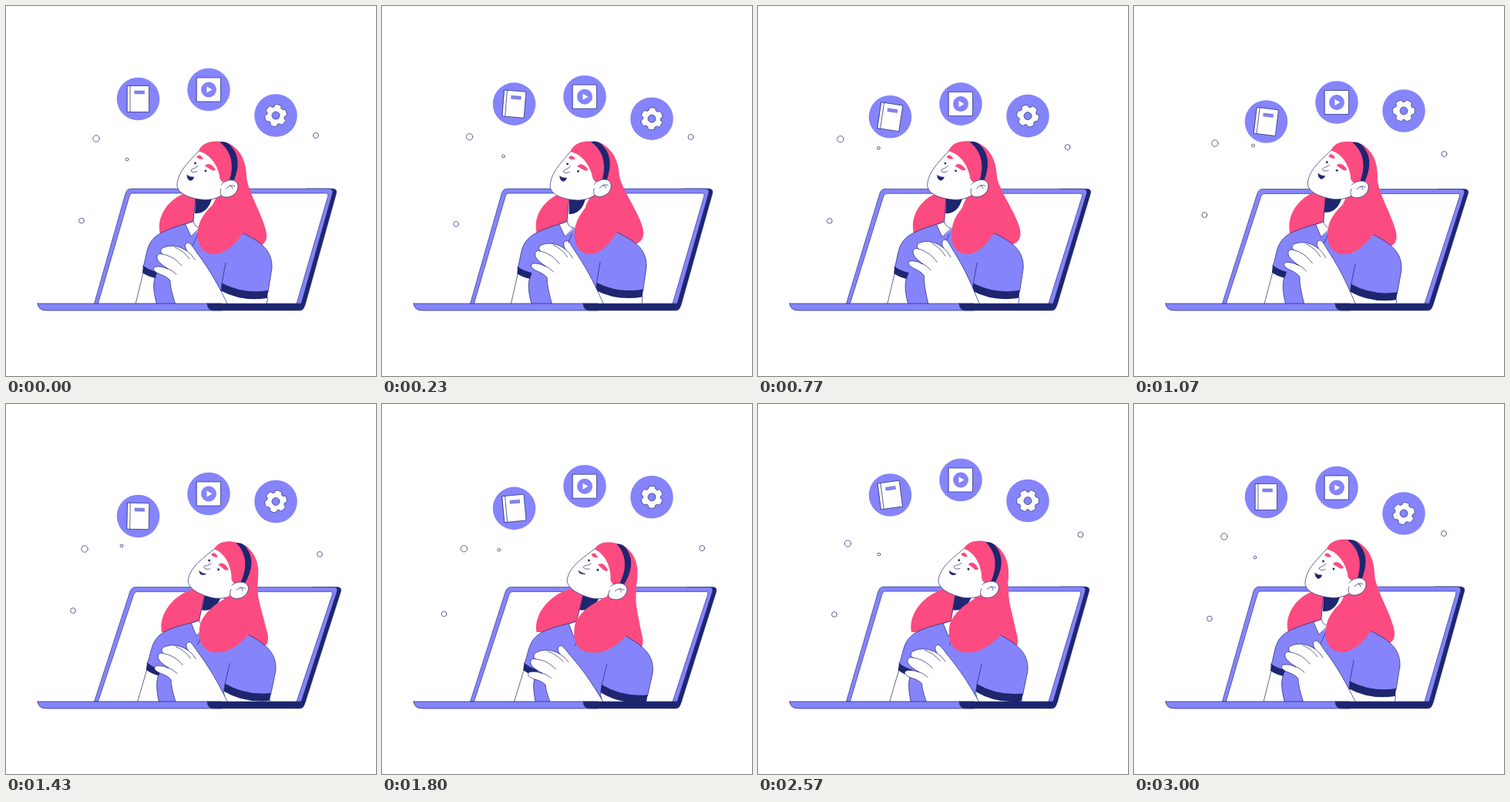
An HTML page with a canvas for the animation above (3.03 s loop, 480x480 px).

```html
<!DOCTYPE html>
<html>
<head>
<meta charset="utf-8">
<style>
html, body { margin: 0; width: 100%; height: 100%; overflow: hidden; background: #fff }
canvas { display: block; width: 480px; height: 480px }
</style>
</head>
<body>
<canvas id="stage"></canvas>
<script>
const PURPLE = '#8584fb', NAVY = '#1e2670', PINK = '#fc4b80', WHITE = '#fff';
const LOOP = 3030, CYCLE = 3000;
const TIMES = [0, 470, 1070, 1430, 2170, 2570];
const canvas = document.getElementById('stage');
const ratio = window.devicePixelRatio || 1;
canvas.width = canvas.height = 480 * ratio;
const ctx = canvas.getContext('2d');
let now = 0;

// Smooth periodic curve through the given values
function track(values, times = TIMES) {
  const n = values.length;
  const time = i => times[(i + n) % n] + Math.floor(i / n) * CYCLE;
  const value = i => values[(i + n) % n];
  let i = n - 1;
  while (time(i) > now) i--;
  const span = time(i + 1) - time(i), u = (now - time(i)) / span;
  const slope = k => (value(k + 1) - value(k - 1)) / (time(k + 1) - time(k - 1)) * span;
  const a = value(i), b = value(i + 1), m = slope(i), k = slope(i + 1);
  return a + m * u + (3 * (b - a) - 2 * m - k) * u * u + (2 * (a - b) + m + k) * u ** 3;
}

function turn(angle, px, py, dx = 0, dy = 0) {
  const c = Math.cos(angle), s = Math.sin(angle);
  return (x, y) => [
    px + dx + (x - px) * c - (y - py) * s,
    py + dy + (x - px) * s + (y - py) * c
  ];
}

const ramp = (v, from, to) => {
  const u = Math.min(1, Math.max(0, (v - from) / (to - from)));
  return u * u * (3 - 2 * u);
};

// Mix of two maps, weighted by place
function mix(f, g, weight) {
  return (x, y) => {
    const w = weight(x, y), a = f(x, y), b = g(x, y);
    return [a[0] + (b[0] - a[0]) * w, a[1] + (b[1] - a[1]) * w];
  };
}

const still = (x, y) => [x, y];

function shape(d, fill, line, map = still) {
  const path = new Path2D(d.replace(/(-?[\d.]+) (-?[\d.]+)/g,
    (_, x, y) => map(+x, +y).map(v => v.toFixed(2)).join(' ')));
  if (fill) { ctx.fillStyle = fill; ctx.fill(path); }
  if (line) { ctx.strokeStyle = NAVY; ctx.lineWidth = line; ctx.stroke(path); }
}

function disc(x, y, r, fill, line, ry = r) {
  ctx.beginPath();
  ctx.ellipse(x, y, r, ry, 0, 0, 7);
  if (fill) { ctx.fillStyle = fill; ctx.fill(); }
  if (line) { ctx.strokeStyle = NAVY; ctx.lineWidth = line; ctx.stroke(); }
}

function box(x, y, w, h, fill, line) {
  shape(`M${x} ${y}L${x + w} ${y}L${x + w} ${y + h}L${x} ${y + h}Z`, fill, line);
}

function badge(x, y, angle, draw) {
  ctx.save();
  ctx.translate(x, y);
  disc(0, 0, 27.8, PURPLE);
  ctx.rotate(angle);
  draw();
  ctx.restore();
}

function book() {
  box(-14, -17, 28, 34, WHITE, .7);
  shape('M-10.5 -17L-10.5 17', null, .7);
  box(-4.5, -10.5, 12.5, 4, PURPLE, .3);
}

function video() {
  box(-15.5, -15.5, 31, 31, WHITE, .7);
  disc(0, 0, 10, PURPLE);
  shape('M-2.5 -4L4.5 0L-2.5 4Z', WHITE);
}

function gear() {
  let d = '';
  for (let i = 0; i < 6; i++) {
    const p = (r, a) => {
      const t = (i * 60 + a) * Math.PI / 180;
      return `${(r * Math.cos(t)).toFixed(2)} ${(r * Math.sin(t)).toFixed(2)}`;
    };
    d += `${i ? 'L' : 'M'}${p(11.8, -22)}L${p(14.4, -16)}Q${p(15, 0)} ${p(14.4, 16)}L${p(11.8, 22)}Q${p(11, 30)} ${p(11.8, 38)}`;
  }
  shape(d + 'Z', WHITE, .6);
  disc(0, 0, 5, PURPLE, .6);
}

function screen() {
  const lean = track([0, 1, 5, 6, 4, 1]);
  const map = (x, y) => {
    const rise = (386 - y) / 149;
    return [x + lean * rise, y + lean * .1 * rise];
  };
  shape('M340 386L390 237L423 237Q430 237 428.500 243L388 388L340 388Z', NAVY, .6, map);
  shape('M114.500 386L155 243Q157 237 162 237L419 237Q425 237.500 423.500 243L383 386Z', PURPLE, .6, map);
  shape('M119.500 386L160 247Q161 243 164 243L415 243Q418.500 243 417.500 247L377 386Z', WHITE, .6, map);
}

function base() {
  shape('M41 386L280 386L280 395L52 395Q42 395 41 386Z', PURPLE, .7);
  shape('M261 386L388 386Q387 395 381 395L270 395Q261 395 261 386Z', NAVY, .5);
}

function face(head) {
  shape('M251 187C241 199 223 213 222 232C222 246 246 251 259 251.500C270 251 278 248 284 242L290 215L272 183Z', WHITE, .7, head);
  shape('M249 207C247 211 239 211 240 214Q243 217 248 214.500', null, .7, head);
  shape('M247 196Q251 190 256 198Q251 200 247 196Z', PINK, 0, head);
  shape('M258 207.500Q264 201 272 212Q270 215 266 212.500Q262 210 258 207.500Z', PINK, 0, head);
  const lid = Math.min(1, Math.max(.3, Math.abs(now - 470) / 110));
  for (const [x, y] of [[245.5, 204], [259, 214]])
    disc(...head(x, y), 1.8 - .4 * lid, NAVY, 0, 1.4 * lid);
  const gape = track([1, .8, .9, .3, 0, .35]);
  shape(`M235 219.500Q239 ${222 + gape * .5} 244 222Q${243 - gape} ${222 + 4.5 * gape} 239 ${222.5 + 4 * gape}Q235 ${222 + 3 * gape} 235 219.500Z`,
    NAVY, .6, head);
}

function person() {
  const head = turn(track([0, -3, 3, 8, 11, 7]) * Math.PI / 180, 291, 237,
    track([0, -5, 3, 13, 17, 11]), track([0, -1, 1, 5, 7, 4]));
  const body = turn(track([0, -.024, .018, .045, .062, .045]), 265, 450,
    0, track([0, 0, 1, 2.5, 4.5, 3]));
  const hand = turn(track([0, .08, .065, .005, -.13, -.05]), 285, 386,
    track([0, 0, 0, 1, 1, 1]), track([0, 0, 0, 2, 3, 3]));
  const sway = track([0, 2, 2.5, 2, -1, -1]), drop = track([0, -5, 1, 6, 12, 9]);
  const tips = (x, y) => [x + sway, y + drop * Math.max(0, (x - 270) / 68)];
  const falling = (x, y) => ramp(y, 215, 290);
  const hair = mix(head, tips, falling);
  const lock = mix(head, mix(tips, body, x => ramp(x, 268, 308)), falling);
  const neck = mix(head, body, (x, y) => ramp(y, 252, 284));

  ctx.save();
  ctx.beginPath();
  ctx.rect(0, 0, 480, 386);
  ctx.clip();

  // Hair behind the shoulders
  shape('M234 242C211 250 194 273 200 296L246 296L256 246Z', PINK, 0, hair);
  shape('M285 177C303 183 312 200 312 222C314 240 330 266 336 287C341 303 337 310 324 313L300 320L255 290L270 245Z', PINK, 0, hair);

  // Shirt and arms
  shape('M178 338C184 322 180 304 204 293C216 287 230 284 243 279L300 291C325 303 346 313 345 340L340 371Q308 376 280 360L279 370L286 396L198 396C191 372 189 358 196 346Q186 343 178 338Z', PURPLE, .7, body);
  shape('M279 369L286 396L337 396L339.500 379Z', WHITE, 0, body);
  shape('M339.500 379L336 400', null, .7, body);
  shape('M178 337Q186 343 196 345L193.500 353Q184 351 177 346Z', NAVY, 0, body);
  shape('M178 346L165.500 397', null, .7, body);
  shape('M280 359.500Q308 374 340 369L339 379Q306 384 279 369.500Z', NAVY, 0, body);
  shape('M285 333L280 360', null, .7, body);
  shape('M249 296L242 311', null, .7, body);

  // Neck
  shape('M246 248L243 280L233 283.500L240 299L253 288L272 250Z', WHITE, 0, neck);
  shape('M233 283.500L240 299L251 288', null, .7, body);
  shape('M246 248L243 278Q244 287 252 288', null, .7, neck);
  shape('M246 250L267 250C264 262 256 270 245 269Z', NAVY, 0, head);

  face(head);

  // Front hair, lock and headband
  shape('M289 178C305 188 312 205 312 225L316 246C319 268 313 288 306.500 296C295 311 283 322 269 322C251 321 246 304 250 285C256 266 270 257 281 246L284 224Z', PINK, 0, lock);
  shape('M250 188.500C253 179 264 174 279 176L292 182L296 226L284 230C278 227 277 224 277 220C274 205 263 191 250 188.500Z', PINK, 0, head);
  shape('M277 176.500Q283 175 288 178C300 188 305 203 296 226L290 226C297 204 291 187 277 176.500Z', NAVY, 0, head);
  const ear = 'M279 232C285 224 301 223 301 234C301 243 292 249 284 248C278 247 277 242 279 237';
  shape(ear + 'Z', WHITE, 0, head);
  shape(ear, null, .7, head);
  shape('M286 237Q290 231 297 233.500M291 233Q294 234 294 237', null, .7, head);

  // Clasped hands
  shape('M224 400C216 376 213 364 213 356C206 348 197 349 192 343C190 338 195 337 204 339L210 341C203 336 195 331 196 325C197 321 200 321 203 322C200 320 200 316 203 314C213 309 225 311 235 318C231 312 232 307 237 307C241 309 245 317 249 322C266 345 276 363 294 400Z', WHITE, .7, hand);
  shape('M203 322C214 324 221 329 228 337M208 340Q215 342 221 348M235 318Q241 322 245 329M219 313Q231 318 238 328', null, .7, hand);
  ctx.restore();
}

function bubbles() {
  const dots = [
    [4.2, [117, 109.5, 105, 102, 112, 116.5], [172, 169.5, 178, 188, 185, 181]],
    [1.9, [157, 157.5, 154.5, 150, 154.5, 157], [199, 189.5, 181, 184, 194, 195]],
    [3.4, null, [278.5, 285, 271, 268, 276.5, 273]],
    [3.5, [402, 401.5, 402.5, 407, 422, 418.5], [168, 174, 192, 195, 177.5, 169.5]]
  ];
  for (const [r, xs, ys] of dots) {
    const x = xs ? track(xs)
      : track([98, 94, 91.5, 87, 80.5, 85, 99], [0, 470, 1070, 1430, 1800, 2170, 2570]);
    disc(x, track(ys), r, WHITE, .7);
  }
}

function frame(ms) {
  now = ms % LOOP % CYCLE;
  ctx.setTransform(ratio, 0, 0, ratio, 0, 0);
  ctx.fillStyle = WHITE;
  ctx.fillRect(0, 0, 480, 480);
  ctx.lineJoin = ctx.lineCap = 'round';
  bubbles();
  badge(171.5, track([120.5, 135, 150, 145.5, 125, 118]), track([0, .14, .12, .02, -.18, -.13]), book);
  badge(263, track([108.5, 125.5, 125, 116.5, 98.5, 98.5]), 0, video);
  badge(350, track([142, 147, 136, 126.5, 118, 125.5]), (1070 - now) / CYCLE * Math.PI * 2 / 3, gear);
  screen();
  person();
  base();
}

const start = performance.now();
function tick() {
  frame(performance.now() - start);
  requestAnimationFrame(tick);
}
tick();
</script>
</body>
</html>
```
